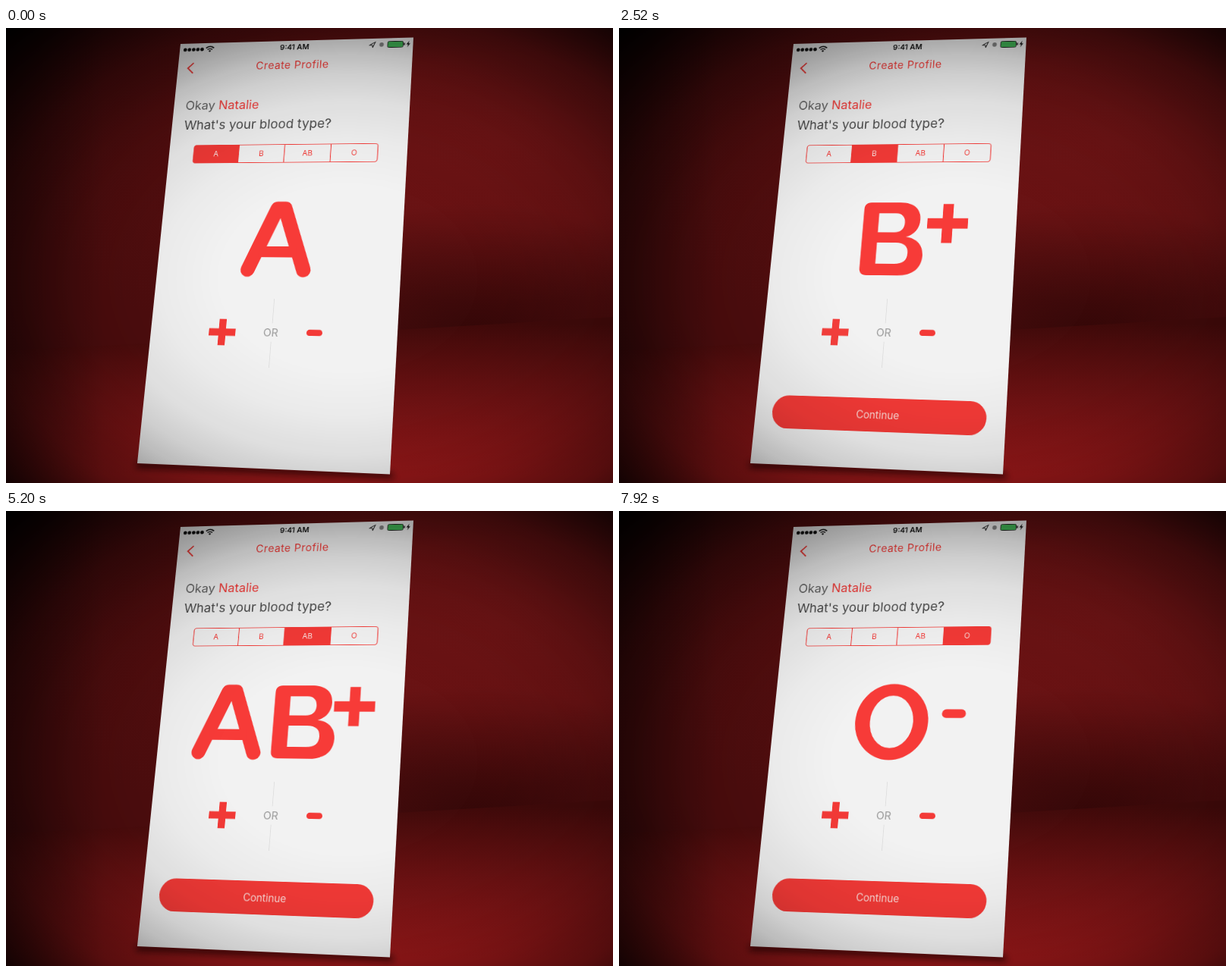
Animation, 800 px wide and 600 px high, one loop 8000 ms. Source, as an HTML page:

```html
<!DOCTYPE html>
<html lang="en">
<head>
<meta charset="utf-8">
<title>Create Profile</title>
<style>
  html, body { margin: 0; width: 100%; height: 100%; overflow: hidden; background: #000; }
  #stage { position: relative; width: 800px; height: 600px; overflow: hidden; }
  #stage > svg { position: absolute; left: 0; top: 0; }
  #panel { position: absolute; left: 0; top: 0; width: 375px; height: 667px; transform-origin: 0 0; }
  #panel svg { display: block; }
  text { font-family: Inter, Roboto, "Liberation Sans", sans-serif; }
  .mid { text-anchor: middle; }
  .red { fill: #f33a37; }
</style>
</head>
<body>
<div id="stage">
  <svg width="800" height="600" viewBox="0 0 800 600">
    <defs>
      <radialGradient id="wall" gradientUnits="userSpaceOnUse" cx="0" cy="0" r="1" gradientTransform="translate(650 150) scale(650 330)">
        <stop offset="0" stop-color="#6e1415"/>
        <stop offset=".35" stop-color="#681213"/>
        <stop offset=".65" stop-color="#540e0f"/>
        <stop offset="1" stop-color="#4e0d0e"/>
      </radialGradient>
      <radialGradient id="corner" gradientUnits="userSpaceOnUse" cx="0" cy="0" r="1" gradientTransform="translate(620 400) scale(300 170)">
        <stop offset="0" stop-color="#180202" stop-opacity=".5"/>
        <stop offset="1" stop-color="#180202" stop-opacity="0"/>
      </radialGradient>
      <linearGradient id="left" gradientUnits="userSpaceOnUse" x1="0" y1="0" x2="130" y2="0">
        <stop offset="0" stop-opacity=".3"/>
        <stop offset="1" stop-opacity="0"/>
      </linearGradient>
      <linearGradient id="floor" gradientUnits="userSpaceOnUse" x1="0" y1="390" x2="0" y2="590">
        <stop offset="0" stop-color="#400a0a"/>
        <stop offset=".5" stop-color="#6e1213"/>
        <stop offset="1" stop-color="#981819"/>
      </linearGradient>
      <radialGradient id="vignette" gradientUnits="userSpaceOnUse" cx="0" cy="0" r="1" gradientTransform="translate(450 330) scale(638 467)">
        <stop offset=".26" stop-opacity="0"/>
        <stop offset=".39" stop-opacity=".03"/>
        <stop offset=".5" stop-opacity=".08"/>
        <stop offset=".57" stop-opacity=".14"/>
        <stop offset=".63" stop-opacity=".22"/>
        <stop offset=".68" stop-opacity=".31"/>
        <stop offset=".75" stop-opacity=".42"/>
        <stop offset=".83" stop-opacity=".62"/>
        <stop offset=".92" stop-opacity=".84"/>
        <stop offset="1" stop-opacity="1"/>
      </radialGradient>
      <filter id="soft" x="-20%" y="-100%" width="140%" height="300%"><feGaussianBlur stdDeviation="4"/></filter>
    </defs>
    <rect width="800" height="600" fill="url(#wall)"/>
    <rect width="800" height="440" fill="url(#corner)"/>
    <path d="M0 425 Q400 406 800 381 V600 H0Z" fill="url(#floor)"/>
    <rect width="800" height="600" fill="url(#left)"/>
    <path d="M172 572 L508 586 L512 594 L172 580Z" fill="#150202" opacity=".7" filter="url(#soft)"/>
    <polygon id="sheet" fill="#f2f2f2"/>
  </svg>

  <div id="panel">
    <svg width="375" height="667" viewBox="0 0 375 667">
      <defs>
        <clipPath id="bar"><rect x="40" y="172.5" width="290" height="29" rx="4"/></clipPath>
      </defs>
      <g id="status" fill="#111">
        <path d="M43.5 8.5 Q50 3 56.5 8.5 M46 11.3 Q50 8 54 11.3" fill="none" stroke="#111" stroke-width="1.8"/>
        <path d="M47.8 13.2 Q50 11.4 52.2 13.2 L50 15.6Z"/>
        <text class="mid" x="188" y="15.2" font-size="12" font-weight="600">9:41 AM</text>
        <path d="M307.5 10.8 L316 6 L312.2 15 L311.8 11.2Z" fill="none" stroke="#222" stroke-width="1.1"/>
        <circle cx="326" cy="10.5" r="3.4" fill="#858585"/>
        <rect x="335.5" y="5.5" width="24" height="10" rx="2" fill="#43b858" stroke="#222" stroke-width="1"/>
        <rect x="360.5" y="8.5" width="1.8" height="4"/>
        <path d="M369 5 L364.5 11.3 H367.3 L366 16 L370.7 9.5 H367.8Z"/>
      </g>
      <path d="M25.5 33.5 L16.5 42.2 L25.5 51" fill="none" stroke="#f33a37" stroke-width="2.2"/>
      <text class="mid red" x="186.5" y="47.5" font-size="17" letter-spacing=".5">Create Profile</text>
      <text x="19" y="113.5" font-size="20" fill="#606060">Okay <tspan class="red">Natalie</tspan></text>
      <text x="20" y="145.7" font-size="20.45" fill="#484848">What's your blood type?</text>

      <g id="segments"></g>

      <g transform="translate(187.5 323)">
        <g id="A" fill="none" stroke="#f73b38">
          <path d="M-45 48.5 L-6 -47.5 H6 L41 48.5" stroke-width="22" stroke-linecap="round" stroke-linejoin="round"/>
          <path d="M-30 20.5 H28" stroke-width="17"/>
        </g>
        <path id="B" fill="#f73b38" fill-rule="evenodd" d="M-47 -46 Q-47 -57 -36 -57 H9 C31 -57 41.5 -46 41.5 -30 C41.5 -17 34 -6 21 -3 C38 -1 48.5 10 48.5 26 C48.5 46 35 57 12 57 H-36 Q-47 57 -47 46Z
          M-23 -40 H3 C13 -40 18 -34 18 -25 C18 -15 12 -10 2 -10 H-23Z M-23 6 H6 C19 6 25.5 12 25.5 22 C25.5 34 19 39 6 39 H-23Z"/>
        <path id="O" fill="#f73b38" fill-rule="evenodd" d="M-56.5 0 a56.5 59.4 0 1 1 113 0 a56.5 59.4 0 1 1 -113 0Z M-33.5 0 a33.5 41 0 1 0 67 0 a33.5 41 0 1 0 -67 0Z"/>
        <path id="plus" fill="none" stroke="#f73b38" stroke-width="16" d="M-31 0 H31 M0 -30.5 V30.5"/>
        <rect id="minus" fill="#f73b38" x="-18.2" y="-6.8" width="36.4" height="13.6" rx="6.8"/>
      </g>

      <path d="M187.5 416 V453 M187.5 481 V520" stroke="#dedede" stroke-width="1"/>
      <text class="mid" x="186" y="473" font-size="16" fill="#979797">OR</text>
      <path id="plusKey" transform="translate(111.5 468)" d="M-20.5 0 H20.5 M0 -20 V20" fill="none" stroke="#f33a37" stroke-width="11"/>
      <rect id="minusKey" class="red" x="240" y="461.8" width="24" height="9.2" rx="4.6"/>

      <g id="next">
        <rect class="red" x="26" y="565" width="321" height="49" rx="24.5"/>
        <text class="mid" x="186.5" y="595" font-size="15.2" fill="#fbdcd9">Continue</text>
      </g>
    </svg>
  </div>

  <svg width="800" height="600" viewBox="0 0 800 600">
    <rect width="800" height="600" fill="url(#vignette)"/>
  </svg>
</div>

<script>
const LOOP = 8000;
const el = id => document.getElementById(id);
const clamp = v => Math.max(0, Math.min(1, v));
const ramp = (t, from, to) => clamp((t - from) / (to - from));
const ease = (t, from, to) => { const p = ramp(t, from, to); return p * p * (3 - 2 * p); };
const easeOut = (t, from, to) => 1 - Math.pow(1 - ramp(t, from, to), 3);
const mix = (a, b, p) => a + (b - a) * p;

// Perspective matrix that fits a w x h box onto four corners, clockwise from top left.
function project(w, h, [[x0, y0], [x1, y1], [x2, y2], [x3, y3]]) {
  const dx1 = x1 - x2, dx2 = x3 - x2, sx = x0 - x1 + x2 - x3;
  const dy1 = y1 - y2, dy2 = y3 - y2, sy = y0 - y1 + y2 - y3;
  const det = dx1 * dy2 - dx2 * dy1;
  const g = (sx * dy2 - dx2 * sy) / det, k = (dx1 * sy - sx * dy1) / det;
  const m = [
    (x1 - x0 + g * x1) / w, (y1 - y0 + g * y1) / w, 0, g / w,
    (x3 - x0 + k * x3) / h, (y3 - y0 + k * y3) / h, 0, k / h,
    0, 0, 1, 0,
    x0, y0, 0, 1
  ];
  return `matrix3d(${m.map(v => v.toFixed(9)).join()})`;
}
const corners = [[230, 21], [537, 12.5], [506, 588.5], [173, 574]];
el('panel').style.transform = project(375, 667, corners);
el('sheet').setAttribute('points', corners.join(' '));

el('status').insertAdjacentHTML('beforeend',
  [0, 1, 2, 3, 4].map(i => `<circle cx="${9 + 7 * i}" cy="10.5" r="2.9"/>`).join(''));

const left = 40, cell = 72.5;
const label = (name, i, fill) =>
  `<text class="mid" x="${left + cell * (i + .5)}" y="191.4" font-size="12" fill="${fill}">${name}</text>`;
el('segments').innerHTML = ['A', 'B', 'AB', 'O'].map((name, i) => `
  ${label(name, i, '#f33a37')}
  <g class="on" clip-path="url(#bar)">
    <rect x="${left + cell * i}" y="172.5" width="${cell}" height="29" fill="#f33a37"/>
    ${label(name, i, '#fbe4e2')}
  </g>`).join('') +
  `<rect x="${left}" y="172.5" width="290" height="29" rx="4" fill="none" stroke="#f33a37" stroke-width="1.2"/>` +
  [1, 2, 3].map(i => `<path d="M${left + cell * i} 172.5 v29" stroke="#f33a37" stroke-width="1.2"/>`).join('');
const fills = [...document.querySelectorAll('.on')];

function show(id, x, y, opacity, scale = 1) {
  const e = el(id);
  e.setAttribute('transform', `translate(${x} ${y}) scale(${scale})`);
  e.setAttribute('opacity', opacity);
}

// A pressed key dims quickly, then recovers.
const press = (t, at, end) => 1 - .55 * ramp(t, at, at + 120) * (1 - easeOut(t, at + 120, end));

function draw(t) {
  const toB = ramp(t, 320, 880), toAB = ramp(t, 3800, 4440), toO = ramp(t, 5520, 6220);
  [1 - toB, toB - toAB, toAB - toO, toO].forEach((v, i) => fills[i].setAttribute('opacity', v));

  const b = ease(t, 320, 840), ab = easeOut(t, 3800, 4840), o = ease(t, 5480, 6040);
  const pos = easeOut(t, 1760, 2400), neg = ease(t, 6680, 7280);
  show('A', t < 2000 ? 0 : mix(-50, -77, ab), 0, t < 2000 ? 1 - b : ab * (1 - o));
  show('B', 38 * ab, 0, b * (1 - o));
  show('O', -ease(t, 6160, 6500), 0, o);
  show('plus', mix(mix(83.5, 114, ab), 93, o), -24.2, pos * (1 - neg), mix(.6, 1, pos));
  show('minus', 94, -13, neg);

  el('plusKey').setAttribute('opacity', press(t, 1760, 2900));
  el('minusKey').setAttribute('opacity', press(t, 6640, 7920));
  const next = easeOut(t, 1800, 2480);
  show('next', 0, 30 * (1 - next), next);
}

function tick() {
  draw(performance.now() % LOOP);
  requestAnimationFrame(tick);
}
tick();
</script>
</body>
</html>
```
